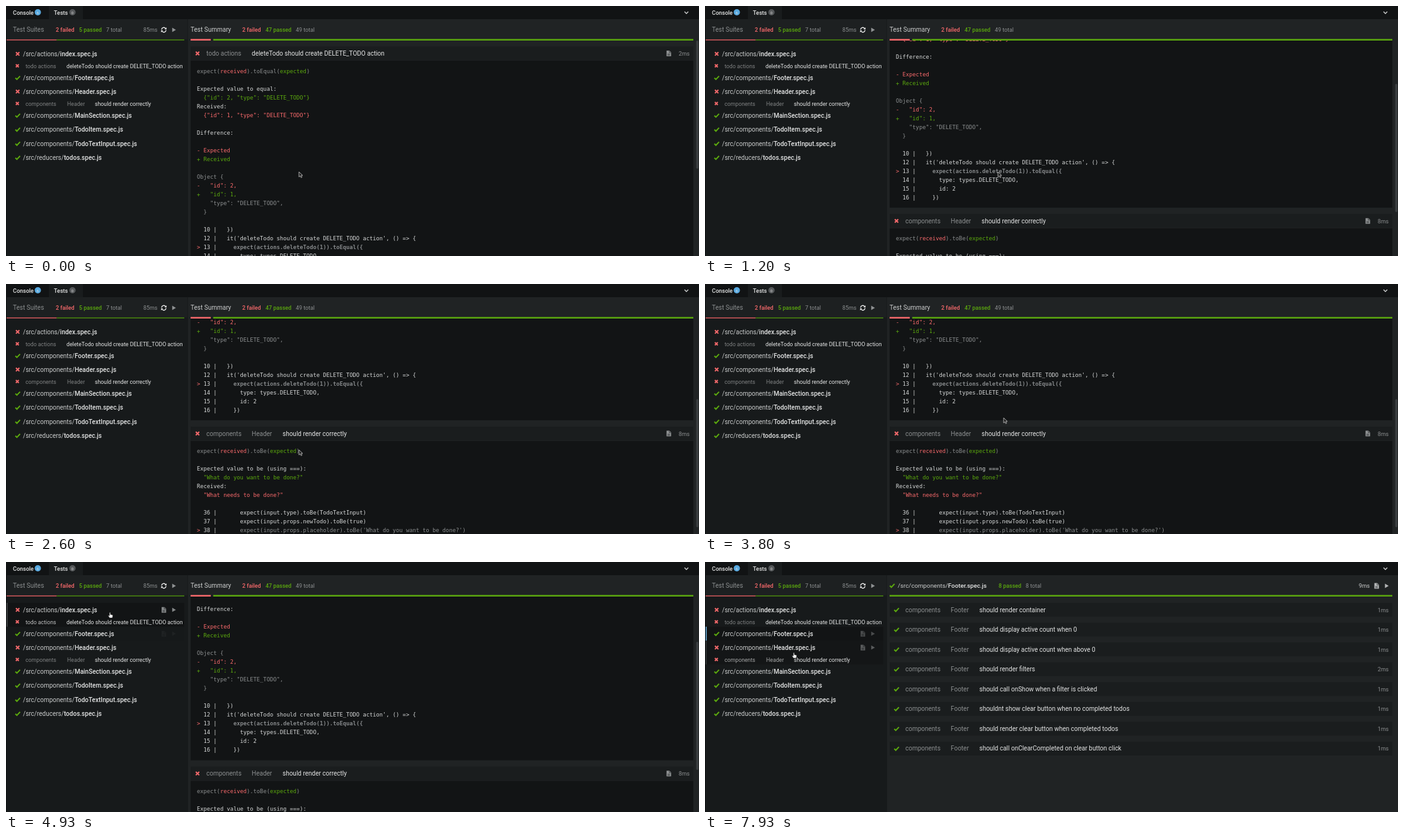
Write an HTML page that moves like this. It is 1100 px wide and 398 px high and loops after 8 s.

```html
<!DOCTYPE html>
<html lang="en">
<head>
<meta charset="utf-8">
<title>Test runner</title>
<style>
html, body { margin: 0; width: 100%; height: 100%; overflow: hidden; background: #181b1c; }
svg { display: block; }
text { font: 10px Roboto, sans-serif; fill: #e4e5e5; white-space: pre; }
.medium { font-weight: 500; }
.small { font-size: 8.9px; }
.sub { font-size: 8.75px; }
.title { font-size: 9.75px; }
.code { font: 8.75px "DejaVu Sans Mono", monospace; fill: #d6d8d8; }
.red { fill: #f96a6c; }
.green { fill: #5ba80e; }
.grey { fill: #8b8e8f; }
.soft { fill: #c9cbcb; }
.dim { fill: #85888a; font-weight: bold; }
.line { fill: none; stroke-width: 2; }
</style>
</head>
<body>
<svg id="stage" width="1100" height="398" viewBox="0 0 1100 398"></svg>
<script>
const rect = (x, y, w, h, fill, more = '') =>
  `<rect x="${x}" y="${y}" width="${w}" height="${h}" fill="${fill}" ${more}/>`;
// y is the optical middle of the text
const text = (x, y, content, cls = '', more = '') =>
  `<text x="${x}" y="${y + 3.5}" class="${cls}" ${more}>${content}</text>`;
const span = (cls, content) => `<tspan class="${cls}">${content}</tspan>`;
const red = s => span('red', s), green = s => span('green', s), grey = s => span('grey', s);
const path = (x, y, d, more) => `<path transform="translate(${x} ${y})" d="${d}" ${more}/>`;

const mark = (ok, x, y, k = 1) => ok
  ? path(x, y, 'M-3.6 .3L-1.2 2.7L3.8-2.6', 'class="line" stroke="#5ba80e"')
  : path(x, y, `M${-2.7 * k} ${-2.7 * k}L${2.7 * k} ${2.7 * k}M${2.7 * k} ${-2.7 * k}L${-2.7 * k} ${2.7 * k}`,
      'class="line" stroke="#f96a6c"');
const fileIcon = (x, y, fill = '#8f9293') =>
  path(x, y, 'M-3.5-4.5H1L3.7-1.8V4.5H-3.5Z', `fill="${fill}"`) +
  path(x, y, 'M.8-4V-1.4H3.4M-2 1H2M-2 2.8H2', 'fill="none" stroke="#1c1f20" stroke-width=".7"');
const playIcon = (x, y, fill = '#8f9293') => path(x, y, 'M-2.7-3.4L3.2 0L-2.7 3.4Z', `fill="${fill}"`);
const badge = (x, fill, n) => `<circle cx="${x}" cy="10" r="5" fill="${fill}"/>` +
  text(x, 9, n, '', 'text-anchor="middle" style="font-size:6px"');

const suites = [
  { ok: 0, dir: 'actions/', file: 'index', y: 65, h: 38,
    sub: [[31, 'todo actions'], [96, 'deleteTodo should create DELETE_TODO action']] },
  { ok: 1, dir: 'components/', file: 'Footer', y: 103, h: 22 },
  { ok: 0, dir: 'components/', file: 'Header', y: 125, h: 38,
    sub: [[31, 'components'], [97, 'Header'], [141, 'should render correctly']] },
  { ok: 1, dir: 'components/', file: 'MainSection', y: 163, h: 22.3 },
  { ok: 1, dir: 'components/', file: 'TodoItem', y: 185.3, h: 22.5 },
  { ok: 1, dir: 'components/', file: 'TodoTextInput', y: 207.8, h: 22.4 },
  { ok: 1, dir: 'reducers/', file: 'todos', y: 230.2, h: 22.5 }
];
const fileName = s => span('soft', '/src/' + s.dir) + span('medium', s.file + '.spec.js');

const suiteRow = s => {
  const mid = s.y + 11.2;
  let out = `<g class="hover">${rect(1, s.y, 282, s.h, '#121415')}${rect(1, s.y, 1.5, s.h, '#4a4d4f')}</g>` +
    rect(1, s.y, 1.7, s.h, '#5d9fc9', 'class="chosen"') +
    mark(s.ok, 18.5, mid) + text(27, mid, fileName(s)) +
    `<g class="icons">${fileIcon(250.5, mid)}${playIcon(266.5, mid)}</g>`;
  if (s.sub) out += mark(0, 18, mid + 19, .85) + s.sub.map(([x, word], i) =>
    text(x, mid + 18.8, word, 'sub', i < s.sub.length - 1 ? 'data-label' : '')).join('');
  return `<g class="suite">${out}</g>`;
};

const testRow = (ok, mid, parts, ms, file) =>
  rect(293, mid - 11, 798, 22, '#1a1d1e') + mark(ok, 304, mid) +
  parts.map(([x, word], i) => text(x, mid, word, i < parts.length - 1 ? 'grey' : '')).join('') +
  text(1085, mid, ms + 'ms', 'small grey', 'text-anchor="end"') + (file ? fileIcon(1052, mid) : '');

const codeBlock = (top, height, lines) => rect(293, top, 798, height, '#121415') +
  lines.map((s, i) => text(303, top + 16 + 14 * i, s, 'code')).join('');

const deleteCode = [
  grey('expect(') + red('received') + grey(').toEqual(') + green('expected') + grey(')'), '',
  'Expected value to equal:', green('  {"id": 2, "type": "DELETE_TODO"}'),
  'Received:', red('  {"id": 1, "type": "DELETE_TODO"}'), '',
  'Difference:', '', red('- Expected'), green('+ Received'), '',
  grey('Object {'), red('-   "id": 2,'), green('+   "id": 1,'), grey('    "type": "DELETE_TODO",'), grey('  }'), '',
  '  10 |   })', "  12 |   it('deleteTodo should create DELETE_TODO action', () => {",
  red('&gt;') + ' 13 |' + span('dim', '     expect(actions.deleteTodo(1)).toEqual({'),
  '  14 |       type: types.DELETE_TODO,', '  15 |       id: 2', '  16 |     })'
];
const headerCode = [
  grey('expect(') + red('received') + grey(').toBe(') + green('expected') + grey(')'), '',
  'Expected value to be (using ===):', green('  "What do you want to be done?"'),
  'Received:', red('  "What needs to be done?"'), '',
  '  36 |       expect(input.type).toBe(TodoTextInput)',
  '  37 |       expect(input.props.newTodo).toBe(true)',
  red('&gt;') + ' 38 |' + grey("       expect(input.props.placeholder).toBe('What do you want to be done?')")
];
const deleteTest = mid =>
  testRow(0, mid, [[318, 'todo actions'], [390, 'deleteTodo should create DELETE_TODO action']], 2, mid < 80) +
  codeBlock(mid + 11.5, 355, deleteCode);

const counts = (...items) => items.map(([x, word, cls]) =>
  text(x, 37.5, word, 'small ' + (cls == 'grey' ? cls : cls + ' medium'))).join('');
const bar = failed => (failed ? rect(293, 52.5, failed, 2.5, '#f96a6c') : '') +
  rect(293 + (failed && failed + 4), 52.5, 798 - (failed && failed + 4), 2.5, '#5ba80e');
const suiteTitle = (s, ms, x) => mark(s.ok, 297, 37.5) + text(306, 37.5, fileName(s), 'title') +
  text(x, 37.5, ms + 'ms', 'small soft', 'text-anchor="end"') +
  fileIcon(1066, 38, '#b4b6b7') + playIcon(1082, 38, '#b4b6b7');
const view = (head, body) => `<g class="view">${head}<g clip-path="url(#pane)"><g class="body">${body}</g></g></g>`;

const footerTests = ['should render container', 'should display active count when 0',
  'should display active count when above 0', 'should render filters',
  'should call onShow when a filter is clicked', 'shouldnt show clear button when no completed todos',
  'should render clear button when completed todos', 'should call onClearCompleted on clear button click'];

const stage = document.getElementById('stage');
stage.innerHTML = '<clipPath id="pane"><rect x="289" y="55" width="811" height="343"/></clipPath>' +
  rect(0, 0, 1100, 398, '#171a1b') + rect(0, 0, 1100, 21, '#111314') + rect(68, 0, 54, 21, '#191c1d') +
  text(11, 10, 'Console', 'medium', 'style="font-size:9px"') + badge(50.5, '#58a9e0', 6) +
  text(76, 10, 'Tests', 'medium', 'style="font-size:9px"') + badge(105.5, '#55585a', 0) +
  path(1080, 10.5, 'M-3-1.5L0 1.5L3-1.5', 'fill="none" stroke="#d0d2d2" stroke-width="1.3"') +
  rect(1, 21, 287, 32, '#1d2021') + rect(289, 21, 811, 377, '#202324') + rect(0, 21, 1, 377, '#0c0e0f') +
  text(11, 37.5, 'Test Suites', 'grey') +
  counts([79, '2 failed', 'red'], [116, '5 passed', 'green'], [159, '7 total', 'grey'], [218, '85ms', 'grey']) +
  path(250.5, 38, 'M-3.6-.4A3.6 3.6 0 0 1 2.9-2.2M3.6 .4A3.6 3.6 0 0 1-2.9 2.2',
    'fill="none" stroke="#eee" stroke-width="1.3"') +
  path(250.5, 38, 'M4.3-4V-.8H1.2ZM-4.3 4V.8H-1.2Z', 'fill="#eee"') + playIcon(266.5, 38) +
  rect(1, 53.3, 79.5, 1.4, '#e05f61') + rect(80.5, 53.3, 202.5, 1.4, '#4f920f') +
  suites.map(suiteRow).join('') +
  view(text(293, 37, 'Test Summary', 'soft') +
    counts([375, '2 failed', 'red'], [412, '47 passed', 'green'], [460, '49 total', 'grey']) + bar(32),
    deleteTest(75.5) +
    testRow(0, 463, [[318, 'components'], [390, 'Header'], [439, 'should render correctly']], 8, true) +
    codeBlock(474.8, 300, headerCode)) +
  view(suiteTitle(suites[0], 21, 1055) +
    counts([439, '1 failed', 'red'], [475, '5 passed', 'green'], [518, '6 total', 'grey']) + bar(132),
    testRow(1, 76, [[318, 'todo actions'], [390, 'addTodo should create ADD_TODO action']], 5) + deleteTest(107.6)) +
  view(suiteTitle(suites[1], 9, 1055) +
    counts([466, '8 passed', 'green'], [509, '8 total', 'grey']) + bar(0),
    footerTests.map((name, i) =>
      testRow(1, 76 + 31.57 * i, [[318, 'components'], [390, 'Footer'], [435.5, name]], i == 3 ? 2 : 1)).join('')) +
  rect(1095.5, 55, 3.5, 204, '#3a3e40', 'id="thumb" rx="1.7"') +
  '<g id="arrow"><path d="M0 0V8.2L2 6.4L3.4 9.3L4.8 8.6L3.5 5.8H6Z" fill="#222" stroke="#c8c8c8" stroke-width=".8"/></g>' +
  '<g id="hand"><path d="M-.8 .8Q0-.4 .8 .8V3.4L4 4.2Q4.8 4.6 4.5 6L3.8 9H-.6L-2.8 5.6Q-2.4 4.4-.8 5.6Z" fill="#f2f2f2" stroke="#222" stroke-width=".5"/></g>';

// Eased interpolation through [time, ...values] keys
const track = (keys, t) => {
  const i = keys.findIndex(k => k[0] > t);
  if (i < 1) return (i ? keys[keys.length - 1] : keys[0]).slice(1);
  const a = keys[i - 1], b = keys[i], p = (t - a[0]) / (b[0] - a[0]), e = p * p * (3 - 2 * p);
  return a.slice(1).map((v, n) => v + (b[n + 1] - v) * e);
};
const scrollKeys = [[470, 0], [1215, 121], [1730, 121], [2010, 224.5], [2270, 225], [3800, 225], [4400, 126.3]];
const pointerKeys = [[2900, 465, 264], [3130, 474, 213], [4450, 474, 213], [4800, 165, 80], [5500, 165, 80],
  [6100, 312, 200], [6200, 312, 200], [6360, 200, 184], [6470, 130, 133], [6650, 130, 133],
  [6980, 135, 108], [7670, 135, 108], [7930, 141, 144]];

const FADE = 250, SAMPLES = 25;
const hovered = t => {
  const [x, y] = track(pointerKeys, t);
  return x < 283 ? suites.findIndex(s => y >= s.y && y < s.y + s.h) : -1;
};

const all = s => [...stage.querySelectorAll(s)];
const rows = all('.suite').map(g => ({
  hover: g.querySelector('.hover'), chosen: g.querySelector('.chosen'),
  icons: g.querySelector('.icons'), labels: [...g.querySelectorAll('[data-label]')]
}));
const views = all('.view'), [summaryBody] = all('.body');
const [thumb, arrow, hand] = ['thumb', 'arrow', 'hand'].map(id => document.getElementById(id));

function draw(t) {
  const current = t < 5330 ? 0 : t < 7070 ? 1 : 2;
  views.forEach((v, i) => v.style.display = i == current ? '' : 'none');

  const [scroll] = track(scrollKeys, t);
  summaryBody.setAttribute('transform', `translate(0 ${-scroll})`);
  thumb.setAttribute('y', current ? 55 : 55 + scroll * .57);
  thumb.setAttribute('height', current ? 229 : 204);
  thumb.style.display = current == 2 ? 'none' : '';

  // Hover fades linearly: the share of recent time spent on each row
  const level = suites.map(() => 0);
  for (let k = 0; k < SAMPLES; k++) {
    const row = hovered(t - k * FADE / SAMPLES);
    if (row >= 0) level[row] += 1 / SAMPLES;
  }
  rows.forEach((r, i) => {
    const chosen = current == i + 1, lit = chosen ? 1 : level[i];
    r.hover.style.opacity = lit;
    r.chosen.style.opacity = +chosen;
    r.icons.style.opacity = level[i];
    r.labels.forEach(label => label.style.opacity = .5 + .35 * lit);
  });

  const [x, y] = track(pointerKeys, t), onRow = hovered(t) >= 0;
  for (const c of [arrow, hand]) {
    c.setAttribute('transform', `translate(${x} ${y})`);
    c.style.display = (c == hand) == onRow ? '' : 'none';
  }
}

const start = performance.now();
(function loop() {
  draw((performance.now() - start) % 8000);
  requestAnimationFrame(loop);
})();
</script>
</body>
</html>
```
